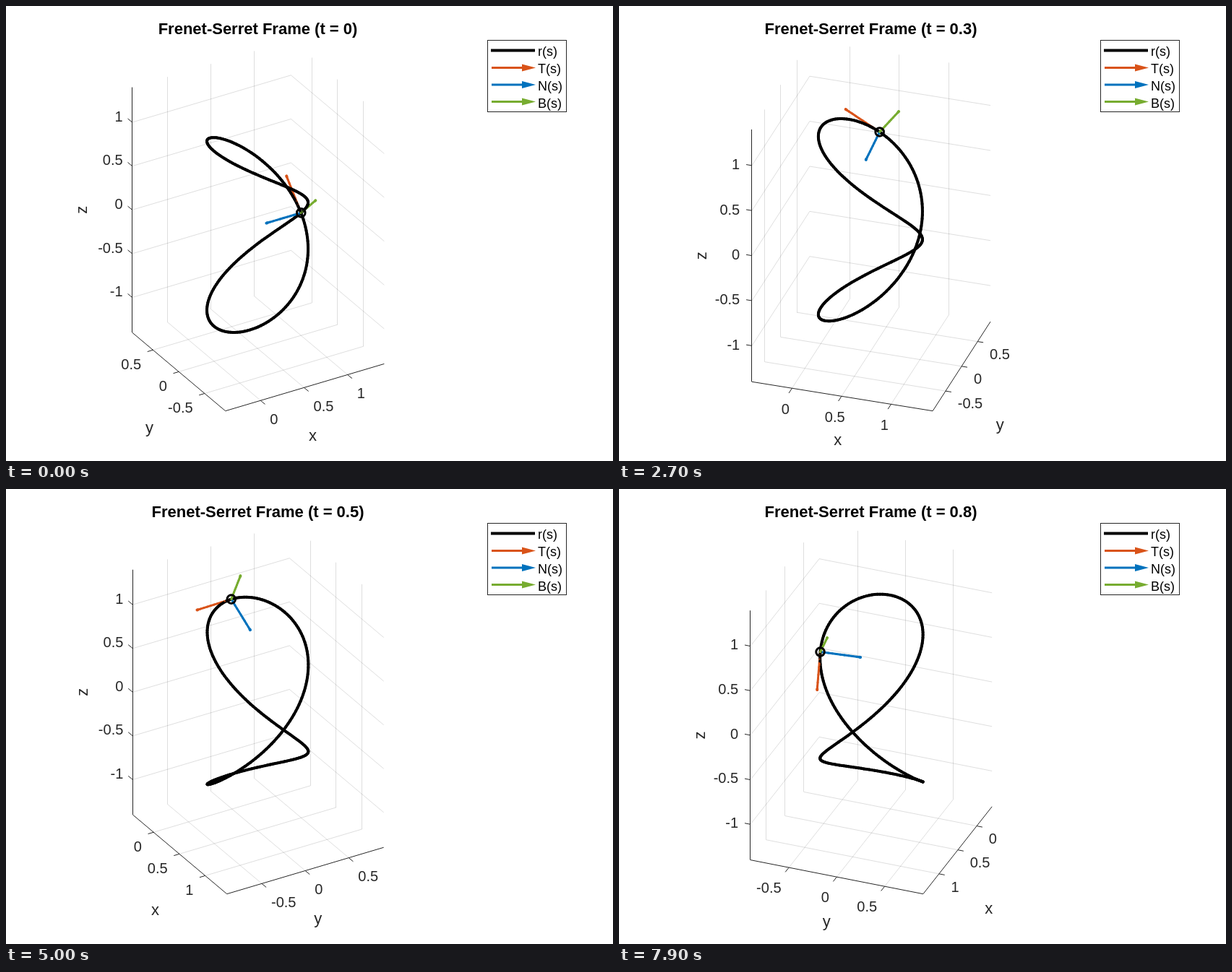
These frames come from a looping animation (840x630 px, 8000 ms). An HTML page with a canvas:

```html
<!DOCTYPE html>
<html lang="en">
<head>
<meta charset="utf-8">
<title>Frenet-Serret Frame</title>
<style>
  html, body { margin: 0; width: 100%; height: 100%; overflow: hidden; background: #fff; }
  canvas, svg { position: absolute; left: 0; top: 0; display: block; }
  svg { font: 18px "Liberation Sans", Arial, sans-serif; }
  #title { font-size: 22px; font-weight: bold; text-anchor: middle; }
</style>
</head>
<body>
<canvas id="plot" width="840" height="630"></canvas>
<svg width="840" height="630" viewBox="0 0 840 630">
  <defs>
    <g id="arrow">
      <path d="M672 0H718" stroke="currentColor" stroke-width="3"/>
      <path d="M714 -5L733 0L714 5Z" fill="currentColor"/>
    </g>
  </defs>
  <text id="title" x="348.5" y="39">Frenet-Serret Frame (t = 0)</text>
  <rect x="666.5" y="47.5" width="109" height="99" fill="#fff" stroke="#262626"/>
  <path d="M671 61.5H732" stroke="#000" stroke-width="4"/>
  <use href="#arrow" y="85.5" color="#D95319"/>
  <use href="#arrow" y="109" color="#0072BD"/>
  <use href="#arrow" y="132.5" color="#77AC30"/>
  <text x="736" y="69">r(s)</text>
  <text x="736" y="93">T(s)</text>
  <text x="736" y="117">N(s)</text>
  <text x="736" y="141">B(s)</text>
</svg>
<script>
const ctx = document.getElementById('plot').getContext('2d');
const title = document.getElementById('title');

const STEP = 100, STEPS = 80, SAMPLES = 240, ARROW = 0.4;
const CX = 349, CY = 304, FIT = 513.4;
const RAD = Math.PI / 180, SIN_EL = 0.5, COS_EL = Math.sqrt(3) / 2;
const MID = [0.508, 0, 0], HALF = [0.9125, 0.902, 1.4];
const TICKS = [[0, 0.5, 1], [-0.5, 0, 0.5], [-1, -0.5, 0, 0.5, 1]];
const COLORS = ['#D95319', '#0072BD', '#77AC30'];
const INK = '#262626', GRID = 'rgba(38,38,38,0.15)';
const FONT = 'px "Liberation Sans", Arial, sans-serif';

let sinAz, cosAz, scale;

function setView(az) {
  sinAz = Math.sin(az);
  cosAz = Math.cos(az);
  const depth = Math.abs(sinAz) * HALF[0] + Math.abs(cosAz) * HALF[1];
  scale = FIT / (2 * (HALF[2] * COS_EL + depth * SIN_EL));
}

// Orthographic projection: screen x, screen y, nearness to the viewer
function project([x, y, z]) {
  const u = x - MID[0];
  const back = cosAz * y - sinAz * u;
  return [
    CX + scale * (cosAz * u + sinAz * y),
    CY - scale * (COS_EL * z + SIN_EL * back),
    SIN_EL * z - COS_EL * back
  ];
}

const add = (a, b, k) => a.map((v, i) => v + k * b[i]);
const unit = v => { const l = Math.hypot(...v); return v.map(c => c / l); };
const cross = (a, b) => [
  a[1] * b[2] - a[2] * b[1],
  a[2] * b[0] - a[0] * b[2],
  a[0] * b[1] - a[1] * b[0]
];

// Viviani's curve
const curve = s => [(1 + Math.cos(s)) / 2, Math.sin(s) / 2, Math.sin(s / 2)];

function frenet(s) {
  const d1 = [-Math.sin(s) / 2, Math.cos(s) / 2, Math.cos(s / 2) / 2];
  const d2 = [-Math.cos(s) / 2, -Math.sin(s) / 2, -Math.sin(s / 2) / 4];
  const T = unit(d1), B = unit(cross(d1, d2));
  return [T, cross(B, T), B];
}

function line(a, b, color, width = 1) {
  let x1 = a[0], x2 = b[0];
  if (Math.abs(x1 - x2) < 0.01) x1 = x2 = Math.floor(x1) + 0.5;
  ctx.strokeStyle = color;
  ctx.lineWidth = width;
  ctx.beginPath();
  ctx.moveTo(x1, a[1]);
  ctx.lineTo(x2, b[1]);
  ctx.stroke();
}

function text(str, x, y, size, align) {
  ctx.font = size + FONT;
  ctx.textAlign = align;
  ctx.fillStyle = INK;
  ctx.fillText(str, x, y);
}

const edge = (axis, sign) => MID[axis] + sign * HALF[axis];

// Point with one coordinate set, the others at the signed limits
function at(signs, axis, value) {
  const p = signs.map((s, i) => edge(i, s));
  if (axis !== undefined) p[axis] = value;
  return project(p);
}

function screenDir(axis, sign) {
  const p = MID.slice();
  p[axis] += sign;
  const [x, y] = project(p), dx = x - CX, dy = y - CY, l = Math.hypot(dx, dy);
  return [dx / l, dy / l];
}

function drawGrid(front) {
  const back = [-front[0], -front[1], -1];
  for (let axis = 0; axis < 3; axis++) {
    for (const v of TICKS[axis]) {
      for (let along = 0; along < 3; along++) {
        if (along === axis) continue;
        const end = back.slice();
        end[along] *= -1;
        line(at(back, axis, v), at(end, axis, v), GRID);
      }
    }
  }
}

function drawTick(p, d) {
  line(p, [p[0] + 8 * d[0], p[1] + 8 * d[1]], INK);
}

// Sideways distance of an axis name; the wider tick labels of y push it further
function nameShift(axis, d) {
  const tilt = Math.asin(Math.min(1, Math.abs(d[0]))) / RAD;
  const bend = Math.max(0, tilt - 50) / 37.5;
  return Math.sign(d[0]) * (tilt * 0.28 + 38.5 * Math.pow(bend, 1.8) + (axis ? 3.5 : -3));
}

function drawFloorAxis(axis, front) {
  const signs = [front[0], front[1], -1], other = 1 - axis;
  const d = screenDir(other, front[other]);
  const side = Math.abs(d[0]) < 0.57 ? 'center' : d[0] > 0 ? 'left' : 'right';
  line(at(signs, axis, edge(axis, -1)), at(signs, axis, edge(axis, 1)), INK);
  for (const v of TICKS[axis]) {
    const p = at(signs, axis, v);
    drawTick(p, d);
    text(String(v), p[0] + 17 * d[0], p[1] + 17 * d[1] + 21.5, 20, side);
  }
  const m = at(signs, axis, MID[axis]);
  text('xy'[axis], m[0] + nameShift(axis, d), m[1] + 93.5 - 31 * d[1], 22, 'center');
}

function drawHeightAxis(front) {
  const corners = [0, 1].map(axis => {
    const signs = [front[0], front[1], -1];
    signs[axis] *= -1;
    return { axis, signs, x: at(signs)[0] };
  });
  const { axis, signs } = corners[0].x < corners[1].x ? corners[0] : corners[1];
  const d = screenDir(axis, signs[axis]);
  line(at(signs, 2, -HALF[2]), at(signs, 2, HALF[2]), INK);
  for (const v of TICKS[2]) {
    const p = at(signs, 2, v);
    drawTick(p, d);
    text(String(v), p[0] + 17 * d[0], p[1] + 14 * d[1] + 7.6, 20, 'right');
  }
  const m = at(signs, 2, 0);
  ctx.save();
  ctx.translate(m[0] - 62.5, m[1]);
  ctx.rotate(-Math.PI / 2);
  text('z', 0, 0, 22, 'center');
  ctx.restore();
}

function drawCurve(s) {
  const parts = [];
  const put = (a, b, color, width) => parts.push({ a, b, color, width, near: a[2] + b[2] });
  const p = curve(s);

  frenet(s).forEach((v, i) => {
    const point = k => project(add(p, v, ARROW * k / 10));
    for (let k = 0; k < 10; k++) put(point(k), point(k + 1), COLORS[i], 3);
    put(point(9.7), point(9.9), COLORS[i], 4);
  });
  for (let i = 0; i < SAMPLES; i++) {
    const h = 4 * Math.PI / SAMPLES;
    put(project(curve(i * h)), project(curve((i + 1) * h)), '#000', 4);
  }

  ctx.lineCap = 'round';
  parts.sort((a, b) => a.near - b.near).forEach(q => line(q.a, q.b, q.color, q.width));
  ctx.lineCap = 'butt';

  const [x, y] = project(p);
  ctx.lineWidth = 3;
  ctx.strokeStyle = '#000';
  ctx.beginPath();
  ctx.arc(x, y, 5.8, 0, 2 * Math.PI);
  ctx.stroke();
}

function draw(n) {
  setView((1.8 * n - 30.7) * RAD);
  const front = [sinAz > 0 ? 1 : -1, cosAz > 0 ? -1 : 1];
  ctx.clearRect(0, 0, 840, 630);
  drawGrid(front);
  drawFloorAxis(0, front);
  drawFloorAxis(1, front);
  drawHeightAxis(front);
  drawCurve(n * 4 * Math.PI / 199);
  title.textContent = `Frenet-Serret Frame (t = ${Math.round(n / 10) / 10})`;
}

let shown = -1;
const start = performance.now();
function tick() {
  const n = Math.floor((performance.now() - start) / STEP) % STEPS;
  if (n !== shown) draw(shown = n);
  requestAnimationFrame(tick);
}
tick();
</script>
</body>
</html>
```
